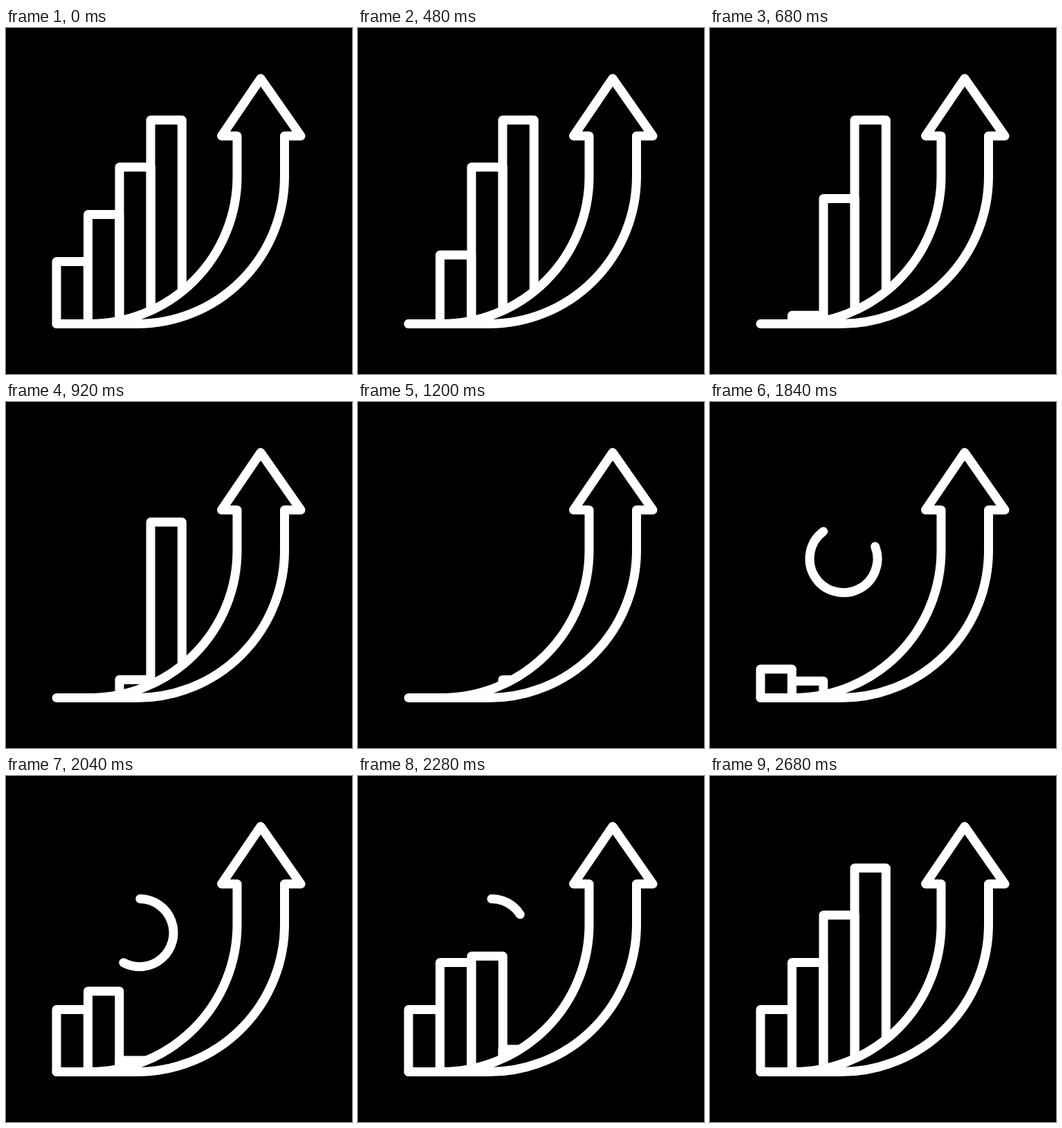
An HTML page that plays this animation: 500x500 px, repeating every 3.16 s.

```html
<!DOCTYPE html>
<html lang="en">
<head>
<meta charset="utf-8">
<title>Growth chart</title>
<style>
html, body { margin: 0; width: 100%; height: 100%; overflow: hidden; background: #000; }
svg { display: block; width: 100vw; height: 100vh; }
path { fill: none; stroke: #fff; stroke-width: 13; stroke-linecap: round; stroke-linejoin: round; }
.cover { fill: #000; stroke: none; }
</style>
</head>
<body>
<svg viewBox="0 0 500 500">
  <g id="bars"></g>
  <!-- hides the parts of the bars below the arrow's inner curve -->
  <path class="cover" d="M334 214.500A213 213 0 0 1 121 427.500V440H334Z"/>
  <path d="M73 427.500H121A213 213 0 0 0 334 214.500V156H311.500L368 73L426 156H402.500V214.500A213 213 0 0 1 189.500 427.500H73"/>
  <path id="ring"/>
</svg>
<script>
const LOOP = 3160, BASE = 427.5, RADIUS = 49;
const bars = [
  { x: 73, top: 337.5, fall: 10, rise: 1680, riseTime: 340 },
  { x: 118.5, top: 269.5, fall: 283, rise: 1722, riseTime: 480 },
  { x: 164, top: 201, fall: 543, rise: 1962, riseTime: 480 },
  { x: 209, top: 133, fall: 809, rise: 2182, riseTime: 480 }
];
const ring = document.getElementById("ring");

for (const bar of bars) {
  bar.path = document.createElementNS("http://www.w3.org/2000/svg", "path");
  document.getElementById("bars").append(bar.path);
}

function ease(time, start, duration) {
  const p = Math.min(1, Math.max(0, (time - start) / duration));
  return p * p * (3 - 2 * p);
}

// Point on the ring, a fraction of a turn counterclockwise from the top.
function ringPoint(turn) {
  const a = turn * 2 * Math.PI;
  return `${193 - RADIUS * Math.sin(a)} ${226.5 - RADIUS * Math.cos(a)}`;
}

function ringPath(from, to) {
  if (to <= from) return "";
  const arcs = [1, 2, 3].map(i => `A${RADIUS} ${RADIUS} 0 0 0 ${ringPoint(from + (to - from) * i / 3)}`);
  return `M${ringPoint(from)}${arcs.join("")}`;
}

function draw(now) {
  const t = now % LOOP;
  for (const { x, top, fall, rise, riseTime, path } of bars) {
    const size = 1 - ease(t, fall, 480) + ease(t, rise, riseTime);
    const y = BASE - (BASE - top) * size;
    path.setAttribute("d", size > 0.001 ? `M${x} ${BASE}V${y}h45.300V${BASE}Z` : "");
  }
  ring.setAttribute("d", ringPath(ease(t, 1683, 800), ease(t, 1265, 800)));
}

const start = performance.now();
function tick() {
  draw(performance.now() - start);
  requestAnimationFrame(tick);
}
tick();
</script>
</body>
</html>
```
